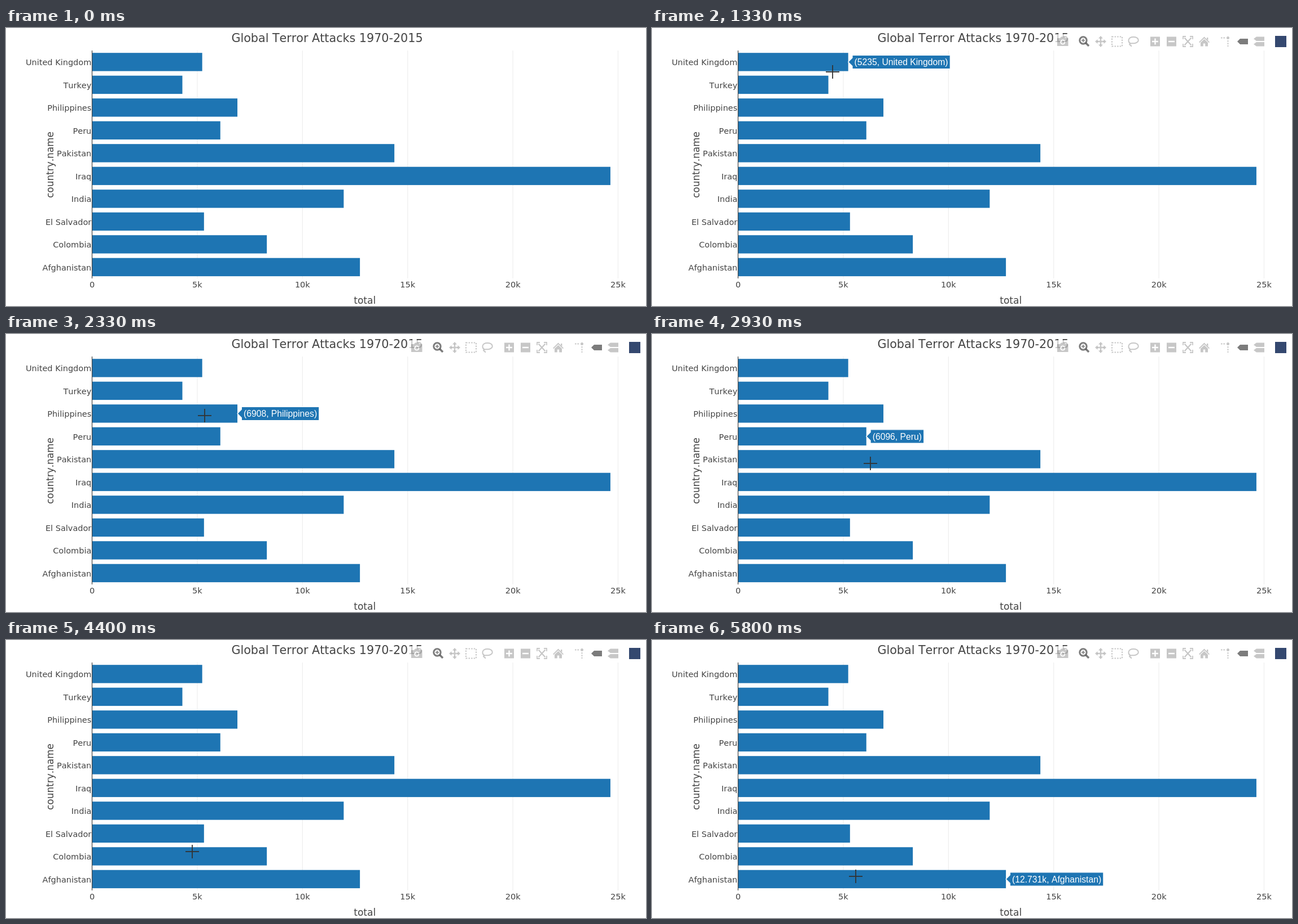
Write an HTML page with a canvas that moves like this. It is 1134x494 px and loops after 5870 ms.

```html
<!DOCTYPE html>
<html lang="en">
<head>
<meta charset="utf-8">
<title>Bar chart with hover labels</title>
<style>
html, body { margin: 0; width: 100%; height: 100%; overflow: hidden; background: #fff; }
canvas { display: block; }
</style>
</head>
<body>
<canvas id="stage" width="1134" height="494"></canvas>
<script>
const ctx = document.getElementById('stage').getContext('2d');
const LOOP = 5870, TICK = 200 / 3, LABEL_LAG = 2;
const BLUE = '#1e75b3', INK = '#444';
const SANS = '"DejaVu Sans", Verdana, sans-serif';
const HOVER_FONT = '15.73px "Liberation Sans", Arial, sans-serif';
const LEFT = 152.5, PER_UNIT = 932 / 25000, TOP = 44.2, PITCH = 40.5, BAR = 32.4;

const bars = [
  ['United Kingdom', 5235], ['Turkey', 4292], ['Philippines', 6908], ['Peru', 6096],
  ['Pakistan', 14368], ['Iraq', 24636], ['India', 11960], ['El Salvador', 5320],
  ['Colombia', 8306], ['Afghanistan', 12731],
];

// Pointer path: [tick, x, y]
const path = [
  [1, 331, 74], [9, 322, 60], [14, 322, 60], [18, 319, 66], [24, 322, 103], [27, 324, 106],
  [29, 336, 123], [35, 352, 145], [36, 354, 150], [38, 370, 196], [42, 372, 196],
  [44, 387, 230], [50, 362, 281], [51, 358, 284], [55, 341, 295], [59, 341, 295],
  [64, 332, 364], [66, 330, 376], [69, 332, 388], [75, 332, 388], [83, 356, 428],
  [86, 356, 428], [87, 361, 420],
];

const LIGHT = 'rgba(68,68,68,.3)', DARK = 'rgba(68,68,68,.7)';
const tag = (x, y, h) => `M${x} ${y} l5 ${-h / 2} h14 v${h} h-14 z`;
const box = (x, y, w, h) => `M${x} ${y} h${w} v${h} h${-w} z`;
const square = x => box(x, 15.5, 17, 17);
const ring = (x, y, r) => `M${x - r} ${y} a${r} ${r} 0 1 0 ${2 * r} 0 a${r} ${r} 0 1 0 ${-2 * r} 0 z`;

// Toolbar icons: [path, colour, stroke width (0 = fill), dash]
const icons = [
  [box(718, 18, 19.5, 14) + 'M723 18 l2 -2.5 h6 l2 2.5 z' + ring(727.8, 25, 4.6) + ring(727.8, 25, 2.6), LIGHT],
  [ring(764, 22, 6.2), DARK, 3],
  ['M768.5 26.5 L774 32', DARK, 3.6],
  ['M761 22 h6 M764 19 v6', DARK, 1.6],
  ['M789 24 h12 M795 18 v12', LIGHT, 2.4],
  ['M785 24 l4.5 -4 v8 z M805 24 l-4.5 -4 v8 z M795 14 l-4 4.5 h8 z M795 34 l-4 -4.5 h8 z', LIGHT],
  [box(815, 15.5, 18, 17), LIGHT, 2, [2.5, 2.1]],
  ['M849 28 c-7 -3 -6 -12 4 -12 c10 0 12 9 3 11 c-5 1 -9 -1 -10 2 c0 2 4 1 3 4', LIGHT, 2],
  [square(883) + box(886, 22.8, 11, 2.4) + box(890.3, 18.5, 2.4, 4.3) + box(890.3, 25.2, 2.4, 4.3), LIGHT],
  [square(912) + box(915, 22.8, 11, 2.4), LIGHT],
  ['M941 20 v-5 h5 M953 15 h5 v5 M958 28 v5 h-5 M946 33 h-5 v-5', LIGHT, 1.8],
  ['M943.5 17.5 l12 13 M955.5 17.5 l-12 13', LIGHT, 2.2],
  ['M969 25 l9.5 -9.5 l9.5 9.5 l-1.3 1.3 l-8.2 -8 l-8.2 8 z M972 26 l6.5 -6.3 l6.5 6.3 v6.5 h-4.8 v-5 h-3.4 v5 h-4.8 z M983 17 h2.4 v5 l-2.4 -2.3 z', LIGHT],
  ['M1008 17.5 h8 M1020.5 22 v11', LIGHT, 2, [2.6, 1.8]],
  [ring(1020.5, 17.5, 2.5), LIGHT],
  [tag(1037, 24, 10), DARK],
  [tag(1066, 19.3, 7.4) + tag(1066, 28.7, 7.4), LIGHT],
  [box(1104, 14, 20, 20), '#34486f'],
].map(([d, ...style]) => [new Path2D(d), ...style]);

function text(str, x, y, size, align) {
  ctx.font = size + 'px ' + SANS;
  ctx.textAlign = align;
  ctx.fillStyle = INK;
  ctx.fillText(str, x, y);
}

function line(x1, y1, x2, y2, color, width) {
  ctx.beginPath();
  ctx.moveTo(x1, y1);
  ctx.lineTo(x2, y2);
  ctx.strokeStyle = color;
  ctx.lineWidth = width;
  ctx.stroke();
}

function drawChart() {
  ctx.fillStyle = '#fff';
  ctx.fillRect(0, 0, 1134, 494);
  for (let k = 0; k <= 25; k += 5) {
    const x = LEFT + k * 1000 * PER_UNIT;
    if (k) line(x, 40, x, 445, '#eee', 1.2);
    text(k ? k + 'k' : '0', x, 461, 14.5, 'center');
  }
  bars.forEach(([name, value], i) => {
    const y = TOP + i * PITCH;
    ctx.fillStyle = BLUE;
    ctx.fillRect(LEFT, y, value * PER_UNIT, BAR);
    text(name, 151.3, y + 21.8, 14.5, 'right');
  });
  line(LEFT, 40, LEFT, 445, INK, 1.2);
  text('Global Terror Attacks 1970-2015', 569, 24.7, 20.7, 'center');
  text('total', 635.7, 490, 17, 'center');
  ctx.save();
  ctx.translate(84, 243);
  ctx.rotate(-Math.PI / 2);
  text('country.name', 0, 0, 16.9, 'center');
  ctx.restore();
}

function drawToolbar(alpha) {
  ctx.save();
  ctx.globalAlpha = alpha;
  ctx.fillStyle = 'rgba(255,255,255,.7)';
  ctx.fillRect(713, 11, 415, 26);
  for (const [shape, color, width, dash] of icons) {
    ctx.fillStyle = ctx.strokeStyle = color;
    ctx.lineWidth = width || 1;
    ctx.setLineDash(dash || []);
    if (width) ctx.stroke(shape);
    else ctx.fill(shape, 'evenodd');
  }
  ctx.restore();
}

function pointerAt(tick) {
  const next = path.findIndex(key => key[0] >= tick);
  if (next <= 0) return path[0].slice(1);
  const a = path[next - 1], b = path[next];
  const f = (tick - a[0]) / (b[0] - a[0]);
  return [a[1] + (b[1] - a[1]) * f, a[2] + (b[2] - a[2]) * f];
}

function drawLabel(y) {
  const i = Math.floor((y - TOP) / PITCH);
  if (!bars[i] || y - TOP - i * PITCH > BAR) return;
  const [name, value] = bars[i];
  const str = `(${value < 10000 ? value : value / 1000 + 'k'}, ${name})`;
  const tip = LEFT + value * PER_UNIT, mid = TOP + i * PITCH + BAR / 2;
  ctx.font = HOVER_FONT;
  ctx.textAlign = 'left';
  const width = ctx.measureText(str).width + 7.3;
  const shape = new Path2D(`M${tip} ${mid} l7.3 -7.3 v-4.8 h${width} v24.2 h${-width} v-4.8 z`);
  ctx.fillStyle = BLUE;
  ctx.fill(shape);
  ctx.strokeStyle = '#fff';
  ctx.lineWidth = 1.2;
  ctx.stroke(shape);
  ctx.fillStyle = '#fff';
  ctx.fillText(str, tip + 10.9, mid + 5.6);
}

function draw(now) {
  const tick = Math.min(87, Math.floor((now % LOOP + 7) / TICK));
  drawChart();
  if (tick > 0) {
    drawToolbar(Math.min(1, (tick - 0.5) / 4.5));
    if (tick > LABEL_LAG) drawLabel(pointerAt(tick - LABEL_LAG)[1]);
    const [x, y] = pointerAt(tick).map(Math.round);
    line(x - 12, y, x + 12, y, '#333', 1.8);
    line(x, y - 12, x, y + 12, '#333', 1.8);
  }
  requestAnimationFrame(() => draw(performance.now() - start));
}

ctx.fontKerning = 'none';
const start = performance.now();
draw(0);
</script>
</body>
</html>
```
